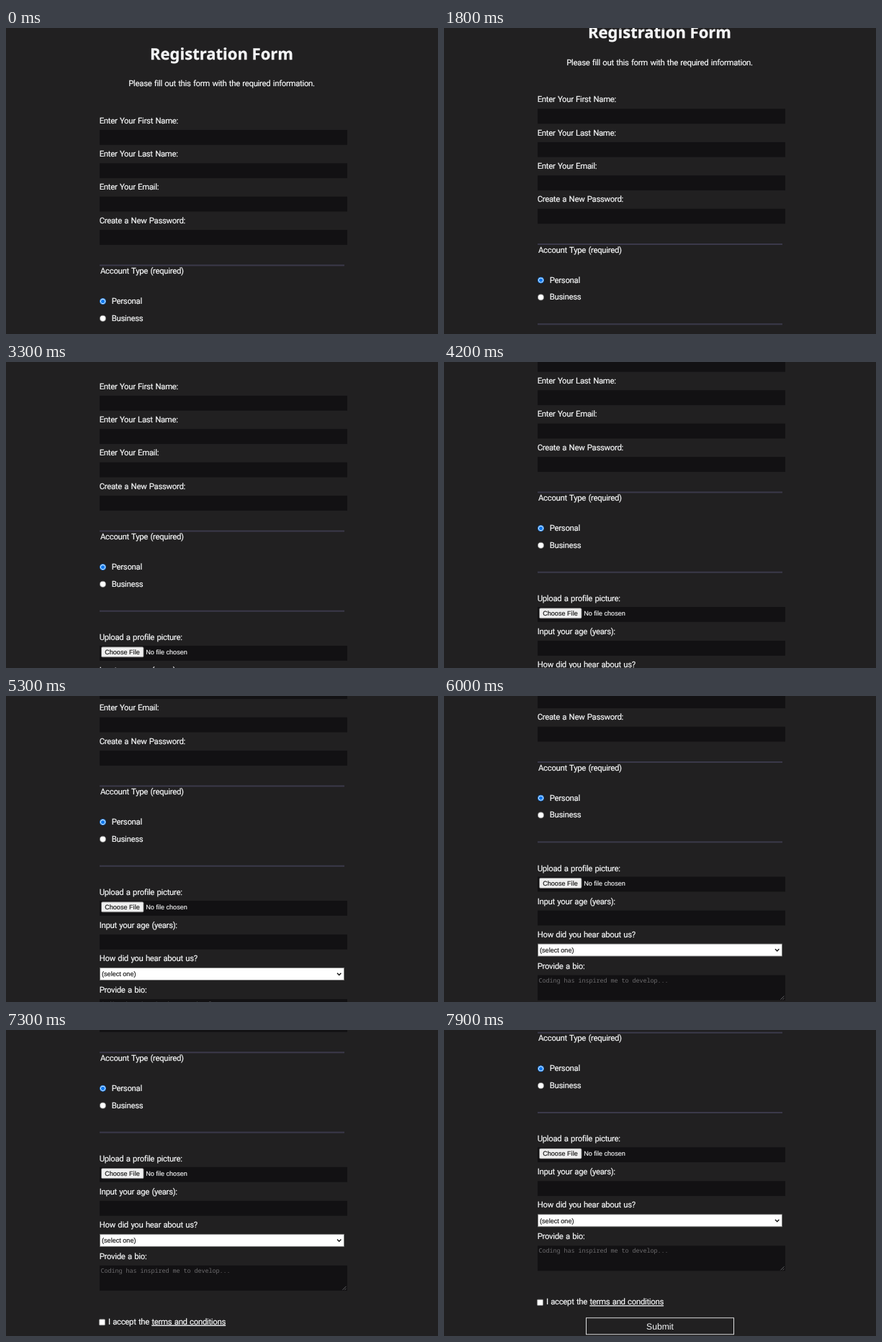
These frames come from a looping animation (600x426 px, 8000 ms). An HTML page:

```html
<!DOCTYPE html>
<html lang="en">
<head>
<meta charset="utf-8">
<title>Registration Form</title>
<style>
  html, body { margin: 0; width: 100%; height: 100%; overflow: hidden; background: #212021; }
  svg { display: block; width: 600px; height: 426px; }
  text { fill: #f5f6f7; text-rendering: geometricPrecision; white-space: pre; }
  .label { font: 11.4px Roboto, "Noto Sans", sans-serif; letter-spacing: -.32px; word-spacing: .9px; stroke: #f5f6f7; stroke-width: .2px; }
  .title { font: bold 22px "Noto Sans", "Open Sans", sans-serif; stroke: #f5f6f7; stroke-width: .3px; }
  .ui { font: 9.1px "Liberation Sans", Arial, sans-serif; stroke: #f5f6f7; stroke-width: .15px; }
  .dark { fill: #111; stroke: #111; }
  .hint { font: 8.5px "Noto Sans Mono", "DejaVu Sans Mono", monospace; letter-spacing: -.1px; fill: #6c6b6d; }
  .submit { font: 12.2px "Liberation Sans", Arial, sans-serif; }
  .mid { text-anchor: middle; }
  .link { text-decoration: underline; }
</style>
</head>
<body>
<svg viewBox="0 0 600 426"><g id="page"></g></svg>
<script>
const page = document.getElementById("page");

function add(tag, attrs, content) {
  const el = document.createElementNS("http://www.w3.org/2000/svg", tag);
  for (const key in attrs) el.setAttribute(key, attrs[key]);
  if (content) el.textContent = content;
  page.appendChild(el);
  return el;
}
const text = (str, x, y, cls = "label") => add("text", { x, y, class: cls }, str);
const rect = (x, y, width, height, fill, more) => add("rect", { x, y, width, height, fill, ...more });
const circle = (cx, cy, r, fill, more) => add("circle", { cx, cy, r, fill, ...more });
const path = (d, stroke, width) => add("path", { d, stroke, "stroke-width": width, fill: "none" });
const field = (y, h = 20.8) => rect(130, y, 344, h, "#121113");
const rule = y => rect(130, y, 340, 2, "#3b394a");

text("Registration Form", 299.5, 43.7, "title mid");
text("Please fill out this form with the required information.", 299.5, 81, "label mid");

["Enter Your First Name:", "Enter Your Last Name:", "Enter Your Email:", "Create a New Password:"]
  .forEach((str, i) => {
    text(str, 129.7, 132.6 + i * 46.4);
    field(141.9 + i * 46.4);
  });

rule(329.4);
text("Account Type (required)", 131, 342);
circle(134.5, 380.5, 4, "#fff", { stroke: "#0a78f0" });
circle(134.5, 380.5, 2.6, "#0a78f0");
text("Personal", 146.8, 384);
circle(134.5, 404.3, 4.1, "#fff", { stroke: "#767676", "stroke-width": .8 });
text("Business", 146.8, 407.7);
rule(440.7);

text("Upload a profile picture:", 129.7, 482);
field(490);
rect(132.5, 491.8, 58.5, 14, "#efefef", { stroke: "#767676", "stroke-width": .8, rx: 1.5 });
text("Choose File", 137.2, 502, "ui dark");
text("No file chosen", 194.2, 502, "ui");

text("Input your age (years):", 129.7, 528);
field(537);

text("How did you hear about us?", 129.7, 574);
rect(130.5, 583.5, 339, 17, "#fff", { stroke: "#767676", "stroke-width": .8 });
text("(select one)", 133, 595.3, "ui dark");
path("M460 590.7l2.7 2.7l2.7-2.7", "#111", 1.4);

text("Provide a bio:", 129.7, 618);
field(627, 35);
text("Coding has inspired me to develop...", 131.6, 637, "hint");
path("M467.5 661l5-5M470.5 661l2-2", "#77767a", .8);

rect(129.4, 701.9, 8.2, 8.2, "#fff", { stroke: "#767676", "stroke-width": .8, rx: 1.2 });
const terms = text("I accept the ", 142, 709);
const link = document.createElementNS("http://www.w3.org/2000/svg", "tspan");
link.setAttribute("class", "link");
link.textContent = "terms and conditions";
terms.appendChild(link);

rect(197.5, 727.5, 205, 23, "#212021", { stroke: "#f0f0f2", "stroke-width": .9 });
text("Submit", 300, 743.3, "submit mid");

// [time in ms, scroll offset in px]
const keys = [
  [1000, 0], [1200, 4], [1800, 29.4], [2400, 57.5], [2500, 57.5],
  [3300, 95], [4200, 149], [5300, 205], [6600, 267], [7900, 326.7]
];
const LOOP = 8000, STEP = 100;

function scrollAt(t) {
  if (t <= keys[0][0]) return 0;
  for (let i = 1; i < keys.length; i++) {
    const [t0, y0] = keys[i - 1], [t1, y1] = keys[i];
    if (t <= t1) return y0 + (y1 - y0) * (t - t0) / (t1 - t0);
  }
  return keys[keys.length - 1][1];
}

const start = performance.now();
function draw(now) {
  const t = Math.max(0, now - start) % LOOP;
  const y = scrollAt(Math.floor(t / STEP) * STEP);
  page.setAttribute("transform", `translate(0 ${-y})`);
  requestAnimationFrame(draw);
}
draw(start);
</script>
</body>
</html>
```
